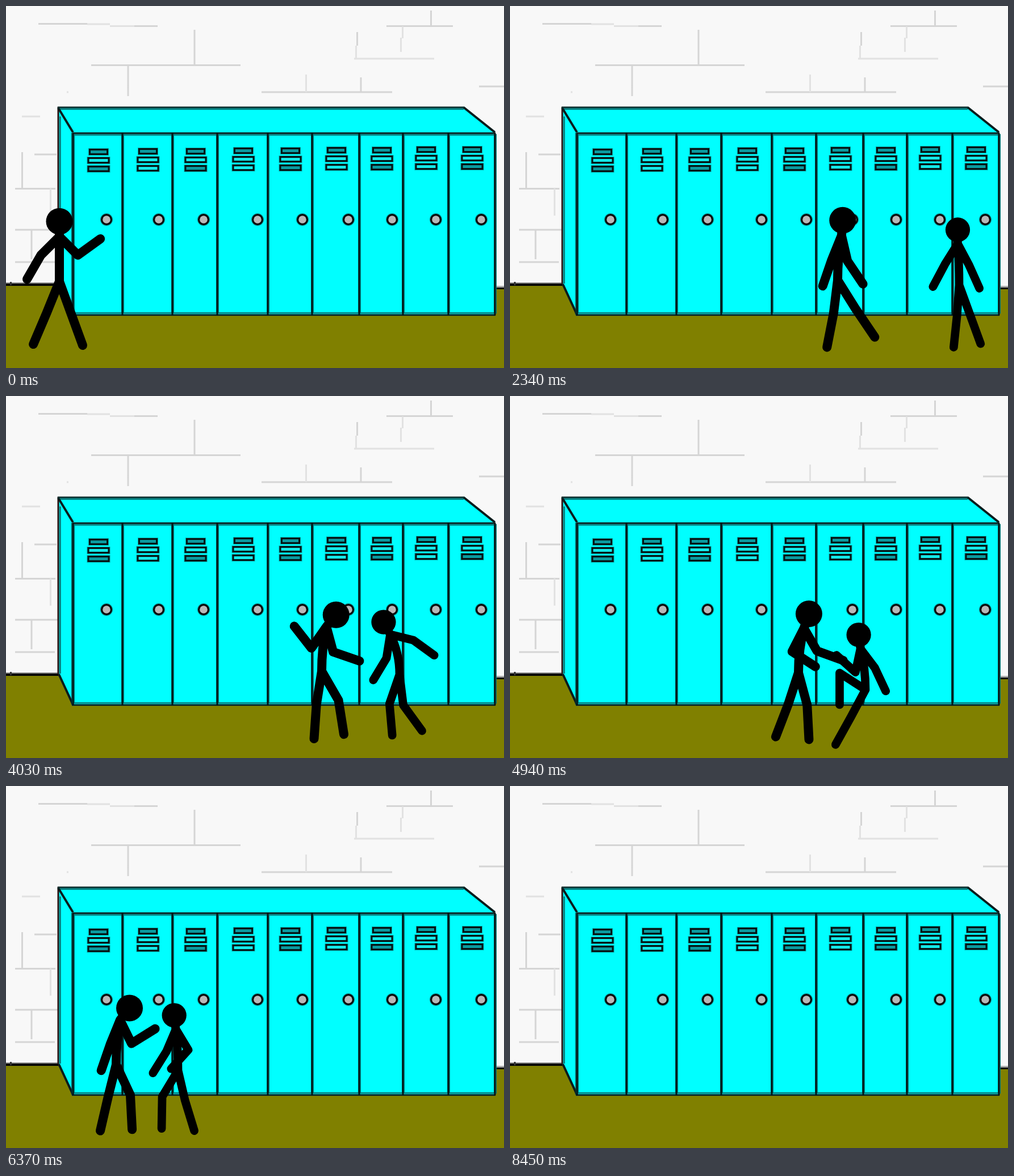
These frames come from a looping animation (877 by 639 pixels, 8.58 s). An HTML page with a canvas:

```html
<!DOCTYPE html>
<html lang="en">
<head>
<meta charset="utf-8">
<title>Locker hallway</title>
<style>
html, body { margin: 0; width: 100%; height: 100%; overflow: hidden; background: #f8f8f8; }
canvas { display: block; width: 877px; height: 639px; }
</style>
</head>
<body>
<canvas id="stage" width="877" height="639"></canvas>
<script>
const W = 877, H = 639, LOOP = 8580, STEP = 130;
const ctx = document.getElementById('stage').getContext('2d');
const room = document.createElement('canvas');
room.width = W;
room.height = H;

function drawRoom(g) {
  const rect = (color, x, y, w, h) => { g.fillStyle = color; g.fillRect(x, y, w, h); };
  const line = (d, color, width) => {
    g.strokeStyle = color;
    g.lineWidth = width;
    g.stroke(new Path2D(d));
  };
  const disc = (x, y, r, color) => {
    g.fillStyle = color;
    g.beginPath();
    g.arc(x, y, r, 0, 7);
    g.fill();
  };

  // wall
  rect('#f8f8f8', 0, 0, W, H);
  line('M57 31.5H143M226 35.5H267M150 104.5H413M670 35.5H787M450 152H680M833 142H877' +
    'M50 262H89M16 322.5H87M16 395H92M16 452H86M332 42V105M215 104V159M748.5 8V35' +
    'M618.5 46V70M625 126V152M28.5 258V322M45 395V447', '#d5d5d5', 3);
  line('M143 32H183M183 35.5H226M613 93H754M28 195H60M698.5 36V57M695.5 56V81' +
    'M616.5 70V93M528.5 121V152M78.5 322V370M107 152H110', '#e2e2e2', 3);

  // floor
  rect('#808000', 0, 491, 130, 148);
  rect('#808000', 110, 498, W, 141);
  rect('#888', 0, 488, 92, 2);
  rect('#000', 0, 490, 93, 4);
  rect('#333', 7, 487, 3, 6);
  rect('#aaa', 862, 494, 15, 3);
  rect('#000', 862, 497, 15, 3);

  // cabinet
  g.fillStyle = '#0ff';
  g.fill(new Path2D('M92 179H806L861 224V545H118L93 491Z'));
  line('M95.5 195V490M116 224V545M94 182H806M118 227.5H861M118 542H861', '#087575', 2.5);
  line('M92 178V491', '#301414', 3);
  line('M92 180L118 223M93 491L118 545M806 179L861 223', '#0a1c1c', 4);
  line('M91 179H807M118 224.5H862M116 545.5H862', '#0c2c2c', 3);

  // doors
  const edges = [118, 205, 293, 372, 461, 539, 622, 699, 779, 861];
  const knobs = [177, 269, 348, 443, 522, 603, 680, 757, 837];
  for (const x of edges) {
    line(`M${x + .5} 226V543`, '#077', 5);
    line(`M${x} 224V546`, '#041616', 3);
  }
  knobs.forEach((knob, i) => {
    const mid = Math.round((edges[i] + edges[i + 1]) / 2) + 1;
    for (let k = 0; k < 3; k++) {
      const w = k ? 39 : 34, x = mid - w / 2, y = Math.floor(252 - i / 2) + 15 * k;
      const dark = k === 0 || (k === 2 && i % 2 === 0);
      rect('#0a9c9c', x - 1, y - 1, w + 2, 13);
      rect('#041414', x, y, w, 11);
      rect(dark ? '#0a9a9f' : '#14e8e8', x + 3, y + 3, w - 6, 5);
    }
    disc(knob, 377, 11, '#0a8c8c');
    disc(knob, 377, 10, '#0a0a0a');
    disc(knob, 377, 6.8, '#b8b8b8');
  });
}
drawRoom(room.getContext('2d'));

// Limb angles in degrees from straight down, positive to the right
const joints = ['armL', 'armR', 'legL', 'legR'];
const rest = { lean: 0, nod: 0, armL: [-22, -19], armR: [21, 37], legL: [-22, -23], legR: [20, 20] };
const pose = change => ({ ...rest, ...change });
const walk = pose({});
const wave = pose({ armL: [-45, -30], armR: [45, 126] });
const stride = pose({ lean: 5, nod: 4, armR: [13, 34], legL: [-7, -11], legR: [32, 34] });
const shove = pose({ lean: 6, nod: 39, armL: [-35, -142], armR: [15, 71], legL: [-9, -4], legR: [30, 9] });
const grab = pose({ lean: 7, nod: 19, armL: [-27, 57], armR: [30, 70], legL: [-18, -21], legR: [15, 3] });
const fist = pose({ lean: 5, nod: 38, armR: [26, 122], legL: [-14, -13], legR: [25, 3] });
const amble = pose({ lean: -2, armL: [-32, -28], armR: [28, 24], legL: [-4, -6] });
const reel = pose({ lean: -13, nod: -28, armL: [-9, -31], armR: [76, 54], legL: [-19, 5], legR: [7, 36] });
const knee = pose({ lean: -7, nod: -7, armL: [-12, -132], armR: [37, 25], legL: [-123, 0], legR: [-28, -29] });
const follow = pose({ lean: -3, nod: -7, armL: [-23, -32], armR: [31, -42], legL: [-31, -1], legR: [13, 17] });

// at: step, x: hip, strides/ease: until the next key, dip: below normal hip height
const key = (at, x, p, more) => ({ at, x, p, strides: 0, ease: 1, dip: 0, ...more });
const tall = { scale: 1, keys: [
  key(0, 94, wave, { strides: 1 }), key(7, 262, walk, { strides: 1 }), key(14, 515, walk),
  key(17, 577, stride), key(28, 572, stride), key(30, 556, shove),
  key(37, 508, grab, { strides: 2, ease: 1.5 }), key(48, 194, fist, { strides: 1 }), key(56, 74, walk)
] };
const short = { scale: .92, keys: [
  key(10, 940, amble, { strides: 1 }), key(14, 804, amble), key(17, 791, amble, { strides: 1 }),
  key(30, 693, reel, { dip: -6 }), key(37, 626, knee, { strides: 2, ease: 1.5, dip: 9 }),
  key(48, 303, follow), key(51, 285, follow, { strides: 1 }),
  key(56, 402, walk, { strides: 2 }), key(63, 805, walk)
] };

const mix = (a, b, u) => a + (b - a) * u;

function stateAt(keys, step) {
  const i = Math.max(0, keys.findIndex(k => k.at > step) - 1);
  const last = step === keys[keys.length - 1].at;
  const a = keys[last ? keys.length - 2 : i], b = keys[last ? keys.length - 1 : i + 1];
  const u = (step - a.at) / (b.at - a.at);
  const p = { lean: mix(a.p.lean, b.p.lean, u), nod: mix(a.p.nod, b.p.nod, u) };
  for (const j of joints) p[j] = a.p[j].map((v, k) => mix(v, b.p[j][k], u));

  // legs trade places, the lifted one bends at the knee
  const turn = 2 * Math.PI * a.strides * u;
  for (const k of [0, 1]) {
    const mid = (p.legL[k] + p.legR[k]) / 2;
    const half = (p.legR[k] - p.legL[k]) / 2 * Math.cos(turn);
    p.legL[k] = mid - half;
    p.legR[k] = mid + half;
  }
  p.legL[1] -= 25 * Math.max(0, Math.sin(turn));
  p.legR[1] -= 25 * Math.max(0, -Math.sin(turn));
  return { p, x: mix(a.x, b.x, u ** a.ease), dip: mix(a.dip, b.dip, u) };
}

const reach = ([x, y], angle, length) => {
  const r = angle * Math.PI / 180;
  return [x + length * Math.sin(r), y + length * Math.cos(r)];
};

function drawActor({ scale, keys }, step) {
  if (step < keys[0].at || step > keys[keys.length - 1].at) return;
  const { p, x, dip } = stateAt(keys, step);
  const hip = [0, 0];
  const shoulder = reach(hip, 180 - p.lean, 79);
  const head = reach(shoulder, 180 - p.nod, 27);
  const limb = (from, [upper, lower], a, b) => {
    const bend = reach(from, upper, a);
    return [from, bend, reach(bend, lower, b)];
  };
  const legs = [p.legL, p.legR].map(l => limb(hip, l, 59, 61));
  const arms = [p.armL, p.armR].map(l => limb(shoulder, l, 46, 49));
  const ground = 599 + step * .2;
  const drop = Math.max(...legs.map(l => l[2][1])) * scale;

  ctx.save();
  ctx.translate(x, ground - drop + dip);
  ctx.scale(scale, scale);
  ctx.lineWidth = 16;
  ctx.lineCap = ctx.lineJoin = 'round';
  ctx.strokeStyle = ctx.fillStyle = '#000';
  ctx.beginPath();
  ctx.moveTo(...hip);
  ctx.quadraticCurveTo(0, -42, ...shoulder);
  ctx.lineTo(...head);
  for (const [from, bend, end] of [...legs, ...arms]) {
    ctx.moveTo(...from);
    ctx.lineTo(...bend);
    ctx.lineTo(...end);
  }
  ctx.stroke();
  ctx.beginPath();
  ctx.arc(...head, 23.5, 0, 7);
  ctx.fill();
  ctx.restore();
}

function draw(now) {
  const step = Math.max(0, Math.floor(now % LOOP / STEP) - 1);
  ctx.drawImage(room, 0, 0);
  drawActor(tall, step);
  drawActor(short, step);
  requestAnimationFrame(draw);
}
draw(0);
</script>
</body>
</html>
```
